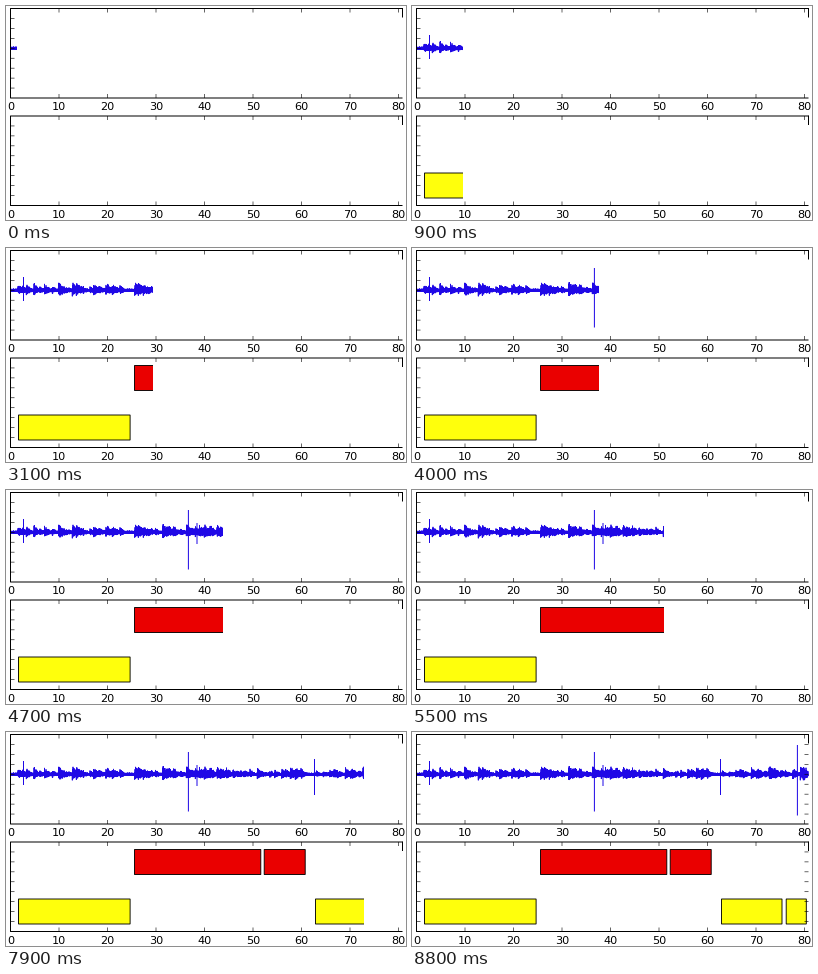
A matplotlib script that plays this animation: 400x214 px, repeating every 8900 ms.

```python
import numpy as np
import matplotlib.pyplot as plt
from matplotlib.animation import FuncAnimation
from matplotlib.patches import Rectangle

W, H, DPI = 400, 214, 100
FRAMES, STEP = 89, 100
PX = 72 / DPI               # one pixel in points
LEFT, RIGHT, UNIT = 4.5, 396.5, 4.85
MID = 42.5
BLUE, YELLOW, RED = "#1f08e6", "#ffff0c", "#ea0000"

plt.rcParams["font.family"] = "DejaVu Sans"
fig = plt.figure(figsize=(W / DPI, H / DPI), dpi=DPI, facecolor="white")
ax = fig.add_axes([0, 0, 1, 1])
ax.set(xlim=(0, W), ylim=(H, 0))
ax.axis("off")


def line(xs, ys, width=1.0, color="black", z=5):
    return ax.plot(xs, ys, color=color, lw=width * PX, zorder=z,
                   solid_capstyle="butt", snap=False)[0]


def panel(top, bottom, baseline):
    """Draw frame, ticks and labels; return the ticks revealed at the end."""
    line([RIGHT, LEFT, LEFT, RIGHT], [top, top, bottom, bottom])
    line([RIGHT, RIGHT], [top - 0.5, top + 9])
    hidden = []
    for y in np.linspace(top, bottom, 10)[1:-1]:
        line([LEFT, LEFT + 4], [y, y], 0.6)
        hidden.append(line([RIGHT - 4, RIGHT], [y, y], 0.6))
    for value in range(0, 81, 10):
        x = LEFT + value * UNIT
        line([x, x], [top, top + 4], 0.6)
        line([x, x], [bottom, bottom - 4], 0.6)
        ax.text(x, baseline, str(value), fontsize=11.2 * PX,
                ha="center", va="baseline")
    return hidden


def waveform():
    """Speech-like noise: syllables with a sharp attack and a slow decay."""
    rng = np.random.default_rng(12)
    x = np.arange(LEFT, RIGHT, 0.25)
    size = np.full(x.size, 1.8)
    start = 12.0
    while start < RIGHT:
        pause = 117 < start < 127 or 298 < start < 308
        peak = rng.uniform(1, 2) if pause else rng.uniform(4, 10)
        age = np.clip(x - start, 0, None)
        burst = peak * np.exp(-age / rng.uniform(4, 9))
        size = np.maximum(size, np.where(x >= start, burst, 0))
        start += rng.uniform(3, 8)
    size *= rng.uniform(0.45, 1, x.size)
    up = np.arange(x.size) % 2 == 0
    return x, MID + np.where(up, -size, 0.65 * size)


def spike(x, top, bottom):
    return line([x, x], [top, bottom], 1.0, BLUE, 3)


def bar(x0, x1, y, color):
    return ax.add_patch(Rectangle((x0, y), x1 - x0, 25, fc=color, ec="black",
                                  lw=0.9 * PX, zorder=3, snap=False))


ticks = panel(2.5, 92.0, 104) + panel(110.0, 199.5, 212)
wave = line(*waveform(), 0.8, BLUE, 3)
spikes = [spike(17.5, 29, 53), spike(182.4, 20, 79.5), spike(191, 33, 54),
          spike(308.5, 27, 63), spike(385.4, 13, 83.5)]
bars = [bar(a, b, 167, YELLOW)
        for a, b in [(12.5, 124.1), (309.5, 370), (374.2, 394.3)]]
bars += [bar(a, b, 117.5, RED) for a, b in [(128.5, 254.8), (258.2, 299.2)]]

revealed = [wave] + ticks + spikes + bars
window = Rectangle((0, 0), 10, H, transform=ax.transData)


def update(n):
    window.set_width(min(11 + 4.39 * n, RIGHT + 0.5))
    for item in revealed:
        item.set_clip_path(window)
    return revealed


anim = FuncAnimation(fig, update, frames=FRAMES, interval=STEP,
                     repeat=True, repeat_delay=0, blit=False)
plt.show()
```
